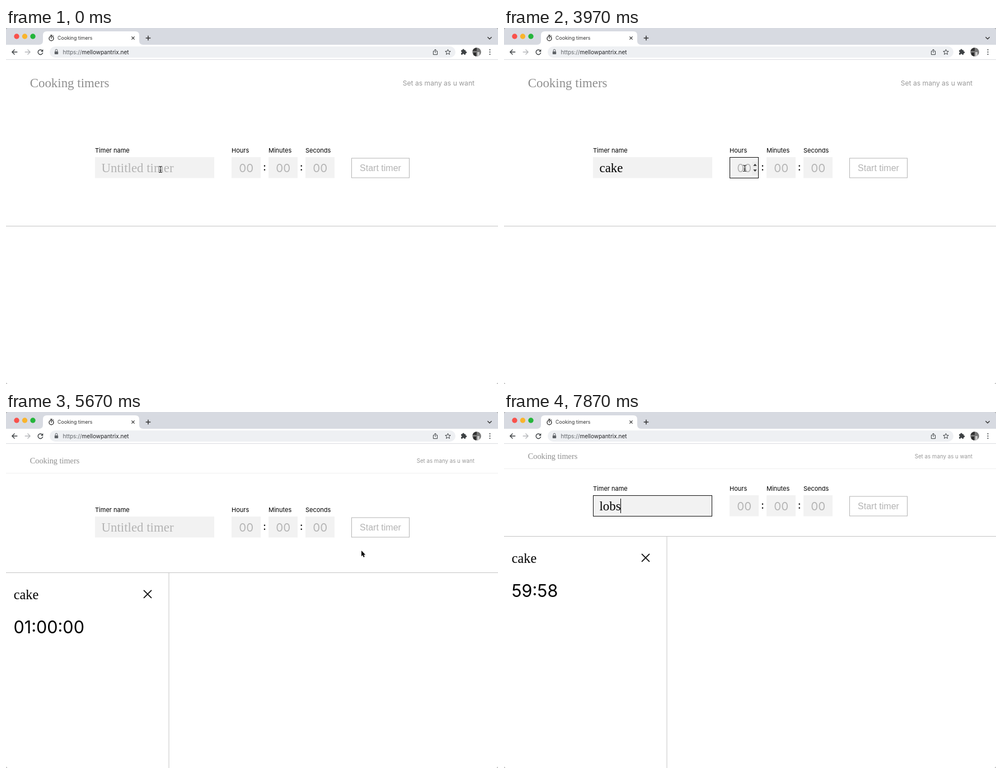
An HTML page with a canvas that plays this animation: 879 px wide and 637 px high, repeating every 8000 ms.

```html
<!DOCTYPE html>
<html lang="en">
<head>
<meta charset="utf-8">
<title>Cooking timers</title>
<style>
html, body { margin: 0; width: 100%; height: 100%; overflow: hidden; background: #fff; }
canvas { display: block; }
</style>
</head>
<body>
<canvas id="stage" width="879" height="637"></canvas>
<script>
const ctx = document.getElementById('stage').getContext('2d');
const W = 879, H = 637, LOOP = 8000;
const SANS = 'Inter, "Liberation Sans", sans-serif';
const SERIF = '"Liberation Serif", serif';
const ARIAL = '"Liberation Sans", sans-serif';
const INK = '#000', PALE = '#b4b4b4', FIELD = '#f2f2f2', ICON = '#3c4043';

const SUBMIT = 5430;
const FIELD_Y = 231;
const fields = {
  name: { x: 159, w: 213, label: 'Timer name', hint: 'Untitled timer', pad: 11.5, font: `22.9px ${SERIF}` },
  hours: { x: 403, w: 52, label: 'Hours', hint: '00', pad: 13.2, font: `20.5px ${SANS}`, number: true },
  minutes: { x: 469, w: 52, label: 'Minutes', hint: '00', pad: 13.2, font: `20.5px ${SANS}`, number: true },
  seconds: { x: 535, w: 52, label: 'Seconds', hint: '00', pad: 13.2, font: `20.5px ${SANS}`, number: true }
};

// [time, focused field, typed values]
const inputs = [
  [0, null, {}],
  [1120, 'name', {}],
  [1770, 'name', { name: 'c' }],
  [1970, 'name', { name: 'ca' }],
  [2170, 'name', { name: 'cak' }],
  [2330, 'name', { name: 'cake' }],
  [3470, 'hours', { name: 'cake' }],
  [4070, 'hours', { name: 'cake', hours: '1' }],
  [SUBMIT, null, {}],
  [6500, 'name', {}],
  [7330, 'name', { name: 'lo' }],
  [7600, 'name', { name: 'lob' }],
  [7870, 'name', { name: 'lobs' }]
];

const easeInOut = p => p < 0.5 ? 4 * p ** 3 : 1 - 4 * (1 - p) ** 3;
const easeOut = p => 1 - (1 - p) ** 2.4;
const progress = (t, start, end) => Math.min(1, Math.max(0, (t - start) / (end - start)));

// [start, end, from, to, easing]
const moves = [
  [2890, 3400, [276, 253], [430, 251], easeInOut],
  [4570, 5330, [430, 252], [635, 248], easeOut],
  [5930, 6430, [635, 248], [273, 173], easeInOut]
];
const hiddenSpans = [[1730, 2890], [4070, 4600], [7330, LOOP]];

function pointerAt(t) {
  if (hiddenSpans.some(([a, b]) => t >= a && t < b)) return null;
  const [start, end, from, to, ease] = moves.filter(m => t >= m[0]).pop() || moves[0];
  const p = ease(progress(t, start, end));
  return { x: from[0] + (to[0] - from[0]) * p, y: from[1] + (to[1] - from[1]) * p };
}

function rect(x, y, w, h, color) {
  ctx.fillStyle = color;
  ctx.fillRect(x, y, w, h);
}

function frame(x, y, w, h, color) {
  ctx.strokeStyle = color;
  ctx.lineWidth = 1;
  ctx.strokeRect(x + 0.5, y + 0.5, w - 1, h - 1);
}

function roundRect(x, y, w, h, r, color) {
  ctx.fillStyle = color;
  ctx.beginPath();
  ctx.roundRect(x, y, w, h, r);
  ctx.fill();
}

function disc(x, y, r, color) {
  ctx.fillStyle = color;
  ctx.beginPath();
  ctx.arc(x, y, r, 0, Math.PI * 2);
  ctx.fill();
}

function text(str, x, y, font, color, align = 'left') {
  ctx.font = font;
  ctx.fillStyle = color;
  ctx.textAlign = align;
  ctx.fillText(str, x, y);
}

function stroke(path, color, width, x = 0, y = 0) {
  ctx.save();
  ctx.translate(x, y);
  ctx.strokeStyle = color;
  ctx.lineWidth = width;
  ctx.stroke(new Path2D(path));
  ctx.restore();
}

function fill(path, color, x = 0, y = 0) {
  ctx.save();
  ctx.translate(x, y);
  ctx.fillStyle = color;
  ctx.fill(new Path2D(path));
  ctx.restore();
}

function drawTabs() {
  rect(0, 0, W, 30, '#d7dae1');
  disc(19, 15, 4.7, '#f9514b');
  disc(33.5, 15, 4.7, '#f9b42c');
  disc(48, 15, 4.7, '#24b53a');
  fill('M59 30Q66 30 66 23V13Q66 6 73 6H231Q238 6 238 13V23Q238 30 245 30Z', '#fff');
  stroke('M4 .8A4 4 0 1 1 -4 .8A4 4 0 1 1 4 .8M-1.7 -5H1.7M0 1V-1.7M3.2 -3.4L4 -4.2', '#222', 1.3, 81, 18);
  text('Cooking timers', 92, 21, `8.75px ${SANS}`, '#333');
  stroke('M-2.6 -2.6L2.6 2.6M2.6 -2.6L-2.6 2.6', '#333', 1.2, 227, 18);
  stroke('M-4.3 0H4.3M0 -4.3V4.3', '#333', 1.5, 254, 18);
  stroke('M-3.6 -1.8L0 1.8L3.6 -1.8', '#333', 1.4, 864, 18);
}

function drawToolbar() {
  rect(0, 30, W, 26, '#fff');
  rect(0, 56, W, 1, '#dbdce0');
  const arrow = 'M-4.6 0H4.8M0 -4.6L-4.6 0L0 4.6';
  stroke(arrow, ICON, 1.4, 15.5, 43);
  ctx.save();
  ctx.scale(-1, 1);
  stroke(arrow, '#b5b7ba', 1.4, -38.5, 43);
  ctx.restore();
  stroke('M3.4 -2.4A4.3 4.3 0 1 0 4.2 1.2', ICON, 1.4, 61.5, 43);
  fill('M4.8 -5V-.6H.4Z', ICON, 61.5, 43);

  roundRect(78, 33, 725, 20, 10, '#eef0f3');
  roundRect(86.8, 42, 6.4, 5, 0.8, '#5f6368');
  stroke('M-1.8 0V-2A1.8 1.8 0 0 1 1.8 -2V0', '#5f6368', 1, 90, 42);
  const urlFont = `10px ${SANS}`;
  text('https://', 101.5, 46.5, urlFont, '#5f6368');
  text('mellowpantrix.net', 101.5 + ctx.measureText('https://').width, 46.5, urlFont, '#202124');

  stroke('M-1.5 -1.6H-3.6V4.6H3.6V-1.6H1.5M0 1.6V-4.6M-2 -2.8L0 -4.8L2 -2.8', ICON, 1, 767, 43);
  let star = '';
  for (let i = 0; i < 10; i++) {
    const r = i % 2 ? 2.2 : 5, a = -Math.PI / 2 + i * Math.PI / 5;
    star += `${i ? 'L' : 'M'}${r * Math.cos(a)} ${r * Math.sin(a)}`;
  }
  stroke(star + 'Z', ICON, 1, 789.5, 43.3);
  roundRect(813, 39.5, 8.2, 8.2, 1, ICON);
  disc(817, 39.2, 1.6, ICON);
  disc(821.6, 43.6, 1.6, ICON);
  disc(813, 43.6, 1.4, '#fff');
  disc(817, 47.7, 1.4, '#fff');
  disc(841, 43, 7.8, '#777');
  ctx.save();
  ctx.beginPath();
  ctx.arc(841, 43, 7.8, 0, Math.PI * 2);
  ctx.clip();
  rect(832, 35, 9, 6, '#333');
  rect(842, 43, 4, 9, '#c9c9c9');
  rect(835, 44, 5, 8, '#2b2b2b');
  ctx.restore();
  for (const y of [39, 43, 47]) disc(864.5, y, 1.1, ICON);
}

function drawHeader(submitted, rest) {
  const y = submitted ? Math.round(16 * rest) : 0;
  const [titleSize, noteSize] = submitted ? [14.3, 9.75] : [22.9, 12.1];
  text('Cooking timers', 42.7, submitted ? 84 + y : 106, `${titleSize}px ${SERIF}`, '#8f8f8f');
  text('Set as many as u want', 837, submitted ? 83 + y : 103, `${noteSize}px ${SANS}`, '#999', 'right');
  if (submitted) rect(0, 101 + y, W, 1, '#f0f0f0');
}

function drawSpinner(right) {
  rect(right - 12, 239, 11, 24, '#ececec');
  const x = right - 6.5;
  fill('M-3.2 1.7L0 -2L3.2 1.7Z', '#333', x, 245);
  fill('M-3.2 -1.7L0 2L3.2 -1.7Z', '#333', x, 255);
}

function drawField(key, value, focused, hovered, caretOn) {
  const f = fields[key], x = f.x + f.pad;
  text(f.label, f.x, 223, `11px ${SANS}`, INK);
  rect(f.x, FIELD_Y, f.w, 37.5, FIELD);
  text(value || f.hint, x, 257.7, f.font, value ? INK : PALE);
  const caretX = x + (value ? ctx.measureText(value).width : 0);
  if (f.number && (focused || hovered)) drawSpinner(f.x + f.w);
  if (!focused) return;
  frame(f.x, FIELD_Y, f.w, 38, '#111');
  if (caretOn) rect(Math.round(caretX - 0.5), 237, 1, 26, INK);
}

function fieldUnder(pointer, formY) {
  if (!pointer) return null;
  const y = pointer.y - formY;
  return Object.keys(fields).find(k => {
    const f = fields[k];
    return pointer.x >= f.x && pointer.x < f.x + f.w && y >= FIELD_Y && y < FIELD_Y + 38;
  });
}

function drawForm(t, formY, hovered) {
  const [since, focus, values] = inputs.filter(s => t >= s[0]).pop();
  const caretOn = Math.floor((t - since) / 500) % 2 === 0;
  ctx.save();
  ctx.translate(0, formY);
  for (const key in fields) {
    drawField(key, values[key], key === focus, key === hovered, caretOn);
  }
  for (const x of [462, 527.7]) text(':', x, 255.3, `500 18px ${SANS}`, INK, 'center');
  const ready = Boolean(values.hours);
  frame(617, 232.5, 104, 36, ready ? '#111' : PALE);
  text('Start timer', 669, 256, `16px ${ARIAL}`, ready ? INK : PALE, 'center');
  ctx.restore();
}

function clock(t) {
  const left = 3600 - Math.max(0, Math.floor((t - 5570) / 1000));
  const parts = [left / 3600, left / 60 % 60, left % 60].map(n => String(Math.floor(n)).padStart(2, '0'));
  return (left < 3600 ? parts.slice(1) : parts).join(':');
}

function drawCard(t, top) {
  rect(290.5, top, 1, H - top, '#c6c6c6');
  text('cake', 13.8, top + 47.7, `24.3px ${SERIF}`, INK);
  stroke('M-7 -7L7 7M7 -7L-7 7', '#111', 1.8, 253, top + 38.8);
  text(clock(t), 13.4, top + 109, `30.6px ${SANS}`, INK);
}

function drawPointer({ x, y }, overField) {
  if (overField) {
    const beam = 'M-2.8 -5.5Q0 -5.5 0 -3.8Q0 -5.5 2.8 -5.5M0 -4.5V4.5M-2.8 5.5Q0 5.5 0 3.8Q0 5.5 2.8 5.5M-1.5 1.5H1.5';
    stroke(beam, 'rgba(255,255,255,.7)', 2.2, x, y);
    stroke(beam, '#111', 1.1, x, y);
  } else {
    const arrow = 'M0 0V10.2L2.3 8.1L3.9 11.9L5.7 11.1L4.1 7.4H7.2Z';
    stroke(arrow, '#fff', 1.6, x, y);
    fill(arrow, '#000', x, y);
  }
}

function drawCorners() {
  const corner = 'M0 0H4Q0 0 0 4Z';
  for (const [sx, sy] of [[1, 1], [-1, 1], [1, -1], [-1, -1]]) {
    ctx.save();
    ctx.translate(sx < 0 ? W : 0, sy < 0 ? H : 0);
    ctx.scale(sx, sy);
    fill(corner, '#aaa');
    ctx.restore();
  }
}

function draw(t) {
  const submitted = t >= SUBMIT;
  const rest = 1 - easeInOut(progress(t, 5445, 5895));
  const formY = submitted ? Math.round(-82 + 78 * rest) : 0;
  const divider = Math.round(222 + 132 * rest);
  const pointer = pointerAt(t);
  const hovered = fieldUnder(pointer, formY);

  rect(0, 0, W, H, '#fff');
  drawHeader(submitted, rest);
  drawForm(t, formY, hovered);
  if (submitted) drawCard(t, divider);
  rect(0, divider, W, 1, '#c4c4c4');
  drawTabs();
  drawToolbar();
  drawCorners();
  if (pointer) drawPointer(pointer, hovered);
}

const startTime = performance.now();
function tick() {
  draw((performance.now() - startTime) % LOOP);
  requestAnimationFrame(tick);
}
tick();
</script>
</body>
</html>
```
